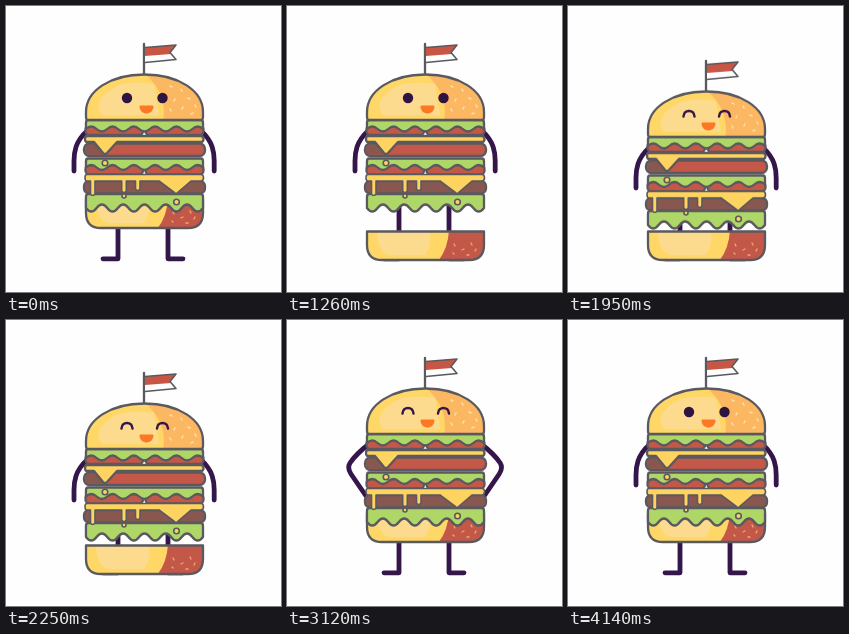
These frames come from a looping animation (275 px wide and 286 px high, 4170 ms). An HTML page:

```html
<!DOCTYPE html>
<html lang="en">
<head>
<meta charset="utf-8">
<title>Happy burger</title>
<style>
  html, body { margin: 0; width: 100%; height: 100%; overflow: hidden; background: #fefefe; }
  svg { display: block; width: 275px; height: 286px; }

  .line { stroke: #5a595f; stroke-width: 2.3; stroke-linejoin: round; stroke-linecap: round; }
  .thin { stroke-width: 1.6; }
  .limb { fill: none; stroke: #34164a; stroke-width: 4.8; stroke-linecap: round; stroke-linejoin: round; }
  .ink { fill: #2f1340; }
  .none { fill: none; }
  .yellow { fill: #fed766; }
  .light { fill: #fddb8e; }
  .orange { fill: #fcb763; }
  .red { fill: #c35848; }
  .brown { fill: #885750; }
  .green { fill: #afd768; }
  .cheese { fill: #fed35f; }
  .seeds { fill: none; stroke: #fee0a0; stroke-width: 1.6; stroke-linecap: round; }
  .dim { stroke: #eba973; stroke-width: 1.3; }

  .base, .body, .arm, .open, .smile { animation: 4170ms infinite both; }
  .base { animation-name: base; animation-timing-function: ease-in-out; }
  .body { animation-name: body; }
  .arm { animation-name: arm; animation-timing-function: ease-in-out; }
  .open { animation-name: open; animation-timing-function: step-end; }
  .smile { animation-name: smile; animation-timing-function: step-end; }

  @keyframes base {
    0%, 5.8% { transform: none; }
    13%, 66.2% { transform: translateY(32px); }
    72.7%, 100% { transform: none; }
  }
  @keyframes body {
    0%, 38.8% { transform: none; animation-timing-function: ease-in; }
    42.4% { transform: translateY(12px); animation-timing-function: ease-out; }
    46% { transform: translateY(17px); animation-timing-function: ease-in-out; }
    51%, 66.2% { transform: translateY(15px); animation-timing-function: ease-in-out; }
    72.7%, 100% { transform: none; }
  }
  @keyframes arm {
    0%, 59.5% { d: path("M82 124 Q73 132 70 141 Q68 147 68 155 L68 165"); }
    67.5%, 82% { d: path("M82 124 Q69 134 63 143 Q60 148 64 154 L79 176"); }
    89%, 100% { d: path("M82 124 Q73 132 70 141 Q68 147 68 155 L68 165"); }
  }
  @keyframes open {
    0% { opacity: 1; }
    40.3% { opacity: 0; }
    87%, 100% { opacity: 1; }
  }
  @keyframes smile {
    0% { opacity: 0; }
    40.3% { opacity: 1; }
    87%, 100% { opacity: 0; }
  }
</style>
</head>
<body>
<svg viewBox="0 0 275 286">
  <defs>
    <path id="crown" d="M82 114 Q80 114 80 111 V106 C80 85 104 68.500 138.500 68.500 C173 68.500 197 85 197 106 V111 Q197 114 195 114 Z"/>
    <path id="heel" d="M80 193.500 H197 V207 Q197 222 182 222 H95 Q80 222 80 207 Z"/>
    <clipPath id="inCrown"><use href="#crown"/></clipPath>
    <clipPath id="inHeel"><use href="#heel"/></clipPath>
    <path id="leaf" class="green line" d="M82 114 H195 Q197 114 197 117 V123 q-5.320 -5 -10.640 0 t-10.640 0 t-10.640 0 t-10.640 0 t-10.640 0 t-10.640 0 t-10.640 0 t-10.640 0 t-10.640 0 t-10.640 0 t-10.640 0 V117 Q80 114 82 114 Z"/>
    <g id="tomato" class="red line">
      <rect x="79.500" y="119.500" width="57.500" height="9.500" rx="4"/>
      <rect x="139.500" y="119.500" width="58" height="9.500" rx="4"/>
    </g>
  </defs>

  <path class="limb" d="M112 185 V252.800 H97 M162 185 V252.800 H177"/>

  <g class="base">
    <g clip-path="url(#inHeel)">
      <rect class="yellow" x="79" y="192" width="119" height="31"/>
      <path class="light" d="M90 192 H142 Q146 206 138 217 H104 Q90 216 90 192"/>
      <path class="red" d="M162 192 Q161 211 151 223 H198 V192 Z"/>
      <path class="seeds dim" d="M167 206 l1 2 M175 212 l2 -1 M184 205 l1 2 M189 211 l-1 2 M180 217 l2 0 M166 215 l1 1"/>
    </g>
    <use href="#heel" class="none line"/>
  </g>

  <g class="body">
    <path class="arm limb" d="M82 124 Q73 132 70 141 Q68 147 68 155 L68 165"/>
    <g transform="matrix(-1 0 0 1 276.200 0)">
      <path class="arm limb" d="M82 124 Q73 132 70 141 Q68 147 68 155 L68 165"/>
    </g>

    <path class="green line" d="M82 188 H195 Q197 188 197 191 V202 q-5.320 7 -10.640 0 t-10.640 0 t-10.640 0 t-10.640 0 t-10.640 0 t-10.640 0 t-10.640 0 t-10.640 0 t-10.640 0 t-10.640 0 t-10.640 0 V191 Q80 188 82 188 Z"/>
    <rect class="brown line" x="78" y="175" width="121" height="12.500" rx="5"/>
    <use href="#tomato" y="39.500"/>
    <use href="#leaf" y="38.500"/>
    <path class="cheese line thin" d="M81 168.500 H195 Q197.500 168.500 197.500 171.700 T195 175 H185 L171 187 Q170 188 169 187 L153 175 H134 V183 Q131.700 186 129.500 183 V175 H120.300 V185 Q118 188 115.700 185 V175 H89 V188 Q86.700 191 84.500 188 V175 H81 Q79 175 79 171.700 T81 168.500 Z"/>
    <circle class="cheese line thin" cx="118" cy="190" r="2"/>
    <circle class="cheese line thin" cx="170.500" cy="196" r="2.800"/>

    <rect class="red line" x="78" y="137.500" width="121" height="12.500" rx="5.500"/>
    <path class="brown" d="M83.500 138.700 H90 L98 148.800 H83.500 Q79.200 148.800 79.200 143.700 T83.500 138.700 Z"/>
    <path class="cheese line" d="M81 130 H195 Q197.500 130 197.500 133 T195 136 H111 L101 147 Q99 149 97 147 L88 136 H81 Q79 136 79 133 T81 130 Z"/>

    <use href="#tomato"/>
    <use href="#leaf"/>
    <circle class="cheese line thin" cx="99" cy="157" r="2.800"/>

    <path class="none line" d="M138 38 V69"/>
    <path fill="#fefefe" d="M139 41.500 L170 39 L164 46.500 L170 53.500 L139 56.500 Z"/>
    <path fill="#c85645" d="M139 41.500 L170 39 L164 46.500 L165 48 L139 50 Z"/>
    <path class="none line thin" d="M139 41.500 L170 39 L164 46.500 L170 53.500 L139 56.500"/>

    <g clip-path="url(#inCrown)">
      <rect class="yellow" x="79" y="68" width="119" height="47"/>
      <path class="light" d="M112 79 Q128 75 148 78 L153 109 H96 Q84 94 112 79"/>
      <path class="orange" d="M139 68 Q162 88 157 115 H198 V68 Z"/>
      <path class="seeds" d="M164 80 l2 1 M175 83 l1 2 M169 93 l-1 2 M182 92 l2 1 M189 99 l1 2 M177 101 l-1 2 M164 103 l1 2 M187 107 l-2 1"/>
    </g>
    <use href="#crown" class="none line"/>

    <g class="open ink">
      <circle cx="121" cy="92" r="5.200"/>
      <circle cx="156.500" cy="92" r="5.200"/>
    </g>
    <path class="smile none" stroke="#34164a" stroke-width="2.500" stroke-linecap="round" d="M115.500 93.500 C116 86 126 86 126.500 93.500 M151 93.500 C151.500 86 161.500 86 162 93.500"/>
    <path fill="#fd7822" d="M134.500 99.500 H146.500 Q147.700 99.500 147.500 101 C146.500 109.700 134.500 109.700 133.500 101 Q133.300 99.500 134.500 99.500 Z"/>
  </g>
</svg>
</body>
</html>
```
